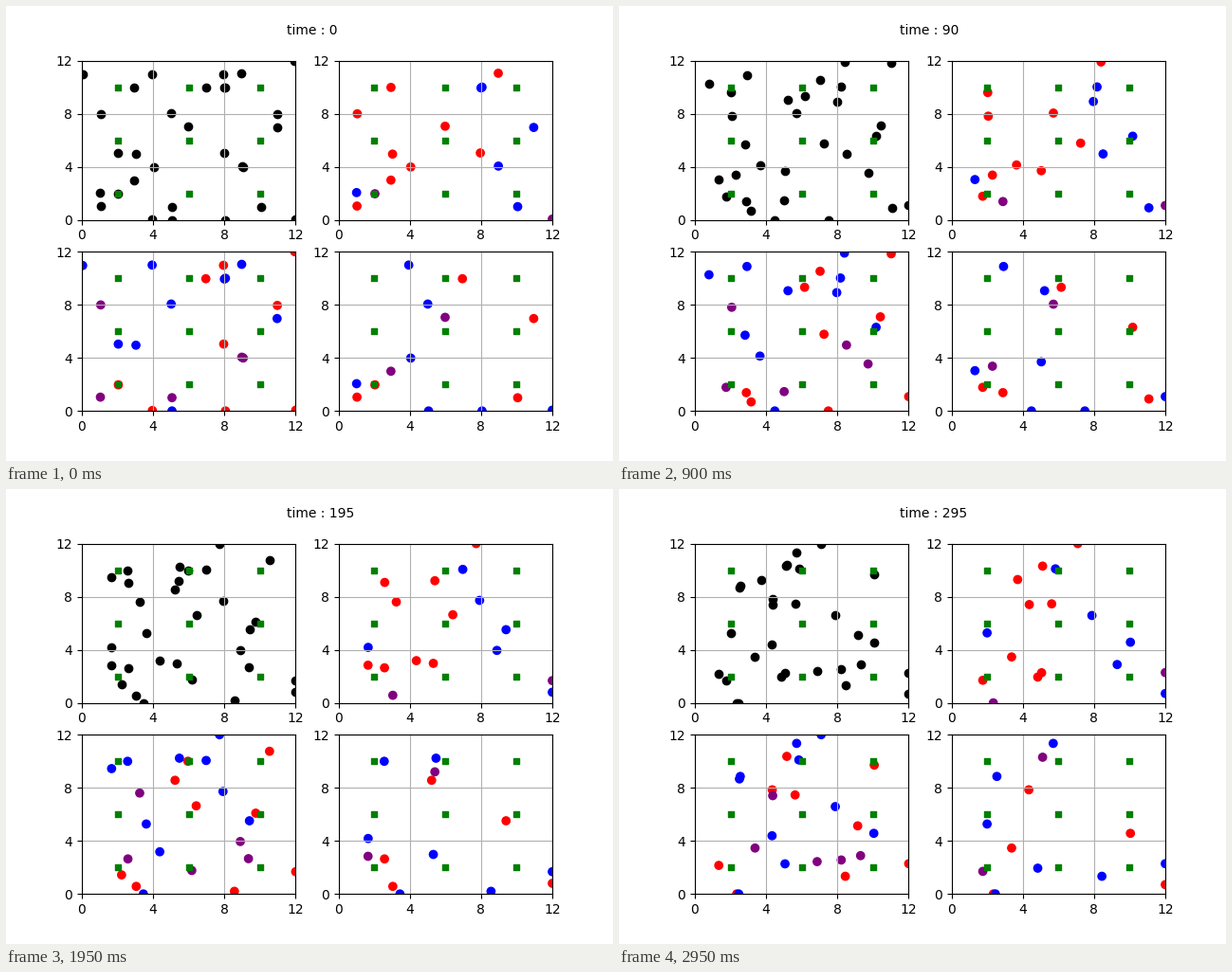
Recreate the animation shown at these times as a matplotlib script. Size 640 by 480 pixels, loop 3000 ms.

```python
import numpy as np
import matplotlib.pyplot as plt
from matplotlib.animation import FuncAnimation

FRAMES = 60
INTERVAL = 50
TICKS_PER_FRAME = 5
SIZE = 12
SPEED = 0.057
COLORS = {"r": "red", "b": "blue", "p": "purple"}


def walk(x, y, heading, *turns):
    """Walk at constant speed, turning to a new heading (degrees) after given
    steps; the walls stop any motion out of the field."""
    pos = np.array([x, y], dtype=float)
    track = []
    for step in range(FRAMES):
        angle = np.radians([heading, *(h for t, h in turns if step > t)][-1])
        pos = np.clip(pos + SPEED * np.array([np.cos(angle), np.sin(angle)]), 0, SIZE)
        track.append(pos)
    return np.array(track)


# one colour key per topic ('-' means absent), and the agent's walk
agents = [
    ("-b-", walk(0, 11, 317)),
    ("rp-", walk(1, 8, 350)),
    ("-rr", walk(7, 10, 219)),
    ("bb-", walk(8, 10, 268)),
    ("-bb", walk(5, 8, 78)),
    ("r-p", walk(6, 7, 105)),
    ("-r-", walk(11, 8, 237)),
    ("rr-", walk(8, 5, 134)),
    ("b-b", walk(1, 2, 73)),
    ("-r-", walk(4, 0, 141)),
    ("rb-", walk(3, 5, 307)),
    ("rpr", walk(1, 1, 46)),
    ("rb-", walk(9, 11, 124)),
    ("b-r", walk(10, 1, 355)),
    ("-bb", walk(4, 11, 186, (24, 269))),
    ("-r-", walk(8, 11, 206, (47, 124))),
    ("-r-", walk(12, 12, 180, (15, 246))),
    ("-b-", walk(2, 5, 41, (24, 309))),
    ("r-b", walk(4, 4, 344, (28, 245))),
    ("bb-", walk(8, 10, 0, (10, 178))),
    ("bbr", walk(11, 7, 220, (37, 304))),
    ("bp-", walk(9, 4, 117, (19, 291))),
    ("prr", walk(2, 2, 325, (29, 232))),
    ("-bb", walk(5, 0, 0, (3, 210))),
    ("r--", walk(3, 10, 200, (17, 270), (29, 11))),
    ("-p-", walk(9, 4, 351, (12, 268), (33, 185))),
    ("prb", walk(12, 0, 88, (30, 350), (47, 88))),
    ("r-p", walk(3, 3, 187, (10, 100), (18, 182), (30, 275))),
    ("-p-", walk(5, 1, 0, (6, 135), (17, 15), (50, 80))),
    ("-rb", walk(8, 0, 0, (3, 210), (19, 10), (39, 96))),
]
tracks = np.stack([track for _, track in agents], axis=1)

fig, axes = plt.subplots(2, 2, figsize=(6.4, 4.8), dpi=100)
post_x, post_y = np.meshgrid([2, 6, 10], [2, 6, 10])
layers = []

for n, ax in enumerate(axes.flat):
    ax.set(xlim=(0, SIZE), ylim=(0, SIZE),
           xticks=range(0, SIZE + 1, 4), yticks=range(0, SIZE + 1, 4))
    ax.grid(True)
    if n == 0:
        members, colors = list(range(len(agents))), "black"
    else:
        keys = [marks[n - 1] for marks, _ in agents]
        members = [i for key in COLORS for i, k in enumerate(keys) if k == key]
        colors = [COLORS[keys[i]] for i in members]
    dots = ax.scatter(*tracks[0, members].T, c=colors)
    ax.scatter(post_x, post_y, s=20, c="green", marker="s")
    layers.append((dots, members))

clock = axes[0, 0].text(11.5, 14, "time : 0")


def update(step):
    for dots, members in layers:
        dots.set_offsets(tracks[step, members])
    clock.set_text(f"time : {step * TICKS_PER_FRAME}")
    return [clock] + [dots for dots, _ in layers]


anim = FuncAnimation(fig, update, frames=FRAMES, interval=INTERVAL,
                     repeat=True, repeat_delay=0, blit=False)
plt.show()
```
